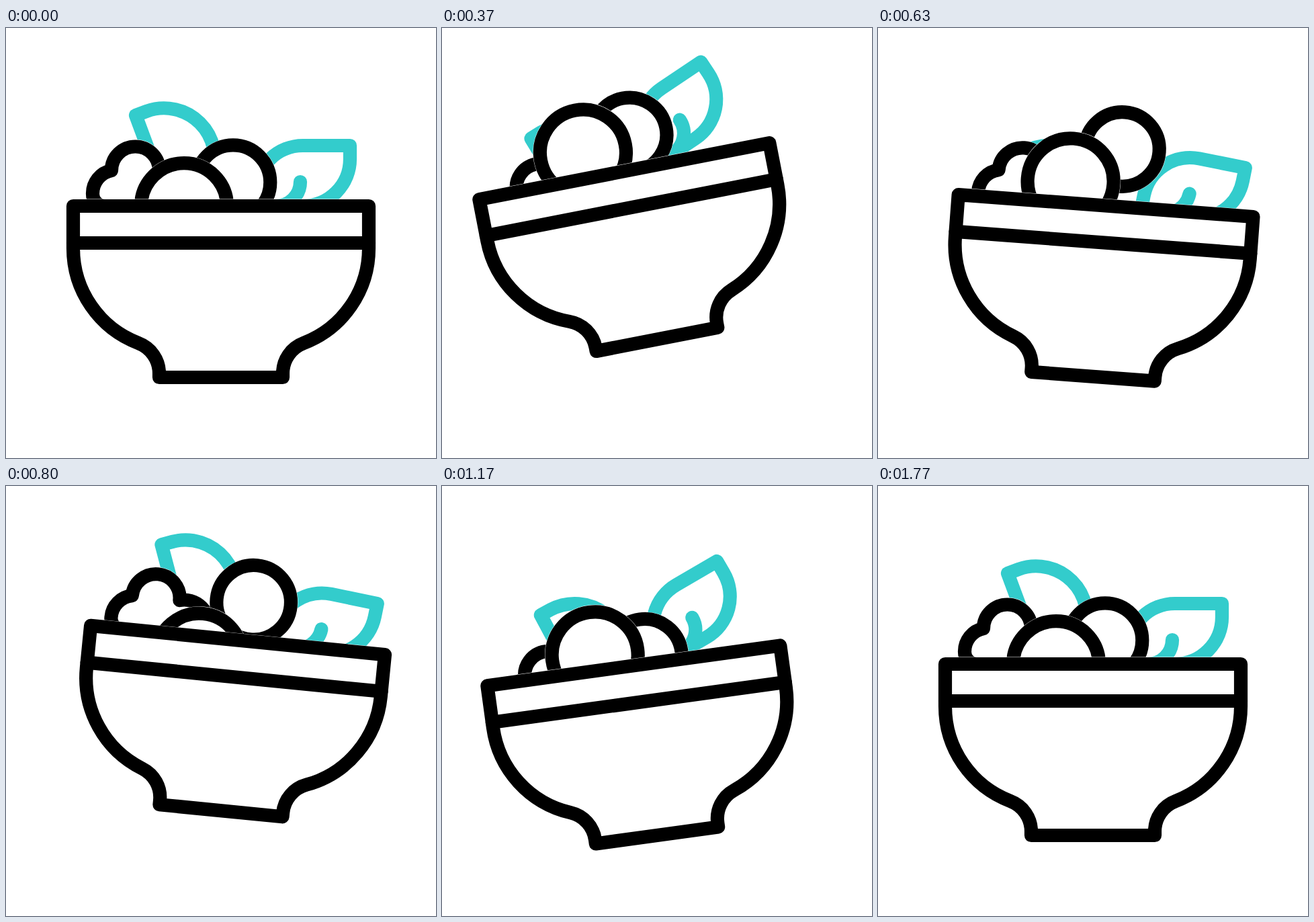
An HTML page for the animation above (2000 ms loop, 640 px wide and 640 px high).

```html
<!DOCTYPE html>
<html lang="en">
<head>
<meta charset="utf-8">
<title>Salad bowl</title>
<style>
  html, body { margin: 0; width: 100%; height: 100%; overflow: hidden; background: #fff; }
  svg { display: block; width: 100%; height: 100%; }
  path { fill: #fff; stroke-width: 20.2; stroke-linejoin: round; stroke-linecap: round; }
  .halo { stroke: #fff; stroke-width: 21; }
  .ink { stroke: #000; }
  .leaf { stroke: #33cccc; }
  .line { fill: none; }
</style>
</head>
<body>
<svg id="stage" viewBox="0 0 640 640"></svg>
<script>
const NS = 'http://www.w3.org/2000/svg';
const LOOP = 2000, FPS = 30;
const PIVOT = '320 520', LEAF_PIVOT = '369 273';

function add(parent, tag, attrs = {}) {
  const el = document.createElementNS(NS, tag);
  for (const name in attrs) el.setAttribute(name, attrs[name]);
  return parent.appendChild(el);
}

function part(parent, kind, outline, detail) {
  const g = add(parent, 'g');
  if (kind === 'ink') add(g, 'path', { d: outline, class: 'halo' });
  add(g, 'path', { d: outline, class: kind });
  if (detail) add(g, 'path', { d: detail, class: kind + ' line' });
  return g;
}

const ring = (x, y, r) =>
  `M${x - r} ${y}a${r} ${r} 0 1 1 ${2 * r} 0a${r} ${r} 0 1 1 ${-2 * r} 0Z`;

const dish = add(document.getElementById('stage'), 'g');
const backLeaf = part(dish, 'leaf',
  'M235 243L193 130L209 124A75.5 75.5 0 0 1 306 221Q300 245 270 255Z');
const sideLeaf = part(dish, 'leaf',
  'M512 175H442A70 70 0 0 0 372 245V265H442A70 70 0 0 0 512 195Z',
  'M438 229A36 36 0 0 1 402 265H372');
const broccoli = part(dish, 'ink',
  'M146 265A18 18 0 0 1 129 247A35 35 0 0 1 157 212A35.3 35.3 0 1 1 228 212A37 37 0 0 1 275 250V265Z');
const smallBall = part(dish, 'ink', ring(338, 229.7, 55.3));
const bigBall = part(dish, 'ink', ring(265, 265.2, 64));
part(dish, 'ink',
  'M100 265H540V328A151 151 0 0 1 443 469A48 48 0 0 0 412 514V520' +
  'H228V514A48 48 0 0 0 197 469A151 151 0 0 1 100 328Z',
  'M100 320H540');

// Keys are [frame, value, slope]; the slope is zero unless given.
const motion = {
  hop: [[0, 0], [6.7, -75], [20, 0], [25, -41], [32.6, 0]],
  tilt: [[0, 0], [11, -11], [22, 7.7], [28, -4.05, -2.2], [32.4, -10], [41, 0]],
  backLeaf: [[0, 0], [16, 79], [27, -12], [40, 68], [53, 0]],
  sideLeaf: [[0, 0], [11, -22.8], [21, 10.5], [34, -23], [45, 0]],
  broccoli: [[0, 0], [11, 53], [22.5, 0], [34, 51], [45, 0]],
  smallBall: [[5.5, 0], [20, -51], [31.2, 45], [42.3, -34], [53, 0]],
  bigBall: [[0, 0], [16, -51], [26.5, 43], [37.5, -34], [47, 0]]
};

function valueAt(keys, f) {
  if (f <= keys[0][0]) return keys[0][1];
  for (let i = 1; i < keys.length; i++) {
    const [t0, v0, m0 = 0] = keys[i - 1], [t1, v1, m1 = 0] = keys[i];
    if (f > t1) continue;
    const span = t1 - t0, u = (f - t0) / span;
    return v0 + (v1 - v0) * u * u * (3 - 2 * u)
      + span * u * (1 - u) * (m0 * (1 - u) - m1 * u);
  }
  return keys[keys.length - 1][1];
}

const place = (el, transform) => el.setAttribute('transform', transform);

function draw(ms) {
  const f = Math.floor((ms % LOOP) * FPS / 1000 + 0.12);
  const at = name => valueAt(motion[name], f).toFixed(3);
  place(dish, `translate(0 ${at('hop')}) rotate(${at('tilt')} ${PIVOT})`);
  place(sideLeaf, `rotate(${at('sideLeaf')} ${LEAF_PIVOT})`);
  place(backLeaf, `translate(0 ${at('backLeaf')})`);
  place(broccoli, `translate(0 ${at('broccoli')})`);
  place(smallBall, `translate(0 ${at('smallBall')})`);
  place(bigBall, `translate(0 ${at('bigBall')})`);
}

const start = performance.now();
function tick() {
  draw(performance.now() - start);
  requestAnimationFrame(tick);
}
tick();
</script>
</body>
</html>
```
